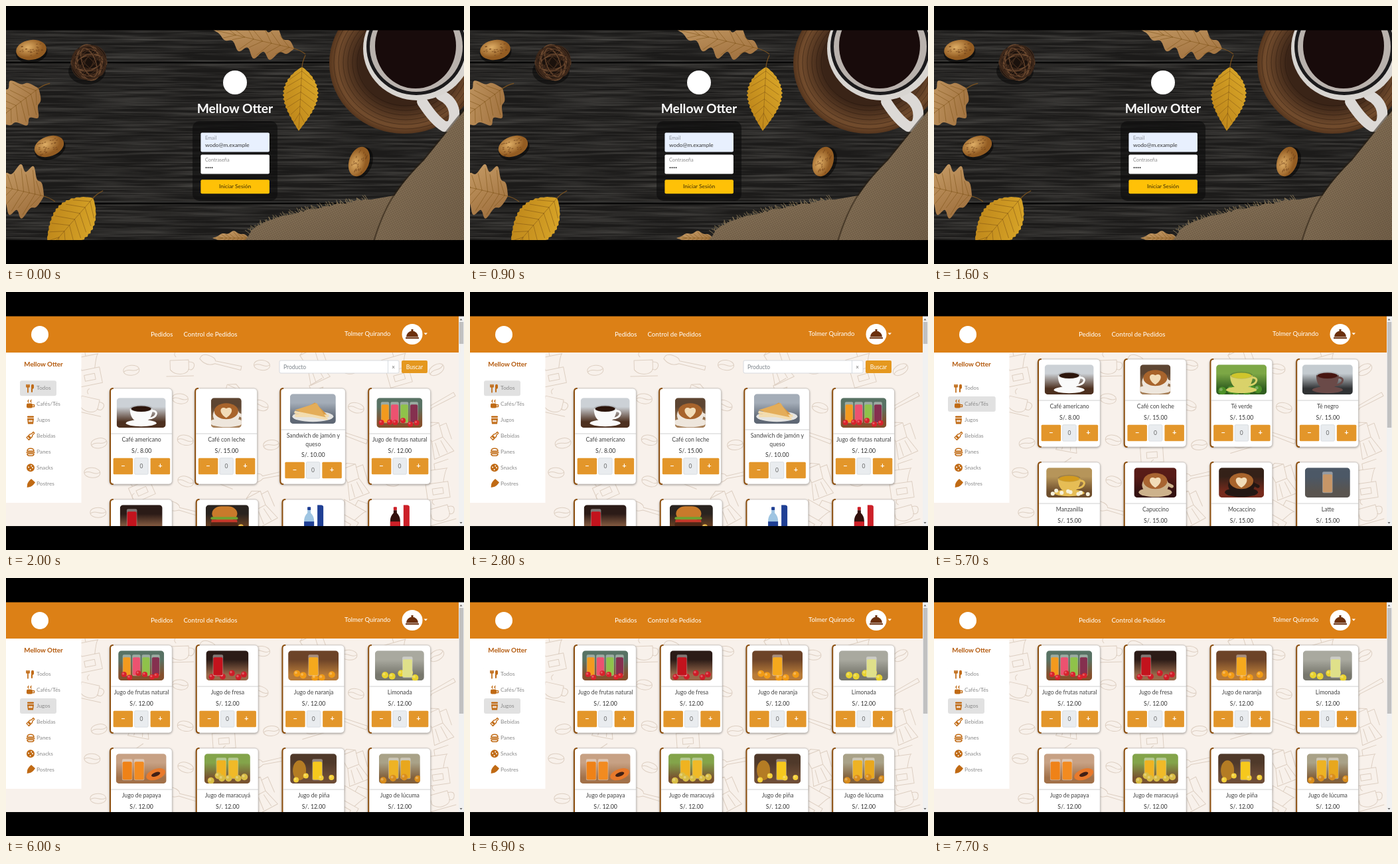
Recreate the animation shown at these times as an HTML page. Size 690 by 388 pixels, loop 8000 ms.

```html
<!DOCTYPE html>
<html lang="es">
<head>
<meta charset="utf-8">
<title>Cafetería</title>
<style>
  html, body { margin: 0; width: 100%; height: 100%; overflow: hidden; background: #000; }
  svg { display: block; width: 100%; height: 100%; font-family: Lato, sans-serif; }
  .scene { visibility: hidden; animation: show 8s step-end infinite; }
  #all { animation-delay: 2s; }
  #coffee { animation-delay: 4s; }
  #juice { animation-delay: 6s; }
  .card { filter: drop-shadow(0 1px 1.5px #0005); }
  .line { fill: none; stroke-linecap: round; stroke-linejoin: round; }
  @keyframes show { 0% { visibility: visible; } 25%, 100% { visibility: hidden; } }
</style>
</head>
<body>
<svg id="stage" viewBox="0 0 690 388">
  <defs>
    <filter id="grain" x="0" y="0" width="1" height="1" color-interpolation-filters="sRGB">
      <feTurbulence type="fractalNoise" baseFrequency=".008 .3" numOctaves="3" seed="4"/>
      <feColorMatrix values="0 0 0 0 .5  0 0 0 0 .49  0 0 0 0 .47  .8 0 0 0 -.29"/>
    </filter>
    <pattern id="weave" width="3" height="3" patternUnits="userSpaceOnUse" patternTransform="rotate(-28)">
      <path d="M0 .5H3M.5 0V3" stroke="#4d3c29" stroke-width=".8" opacity=".4"/>
    </pattern>
    <linearGradient id="cloth" x2="1" y2="1"><stop stop-color="#8f7a5f"/><stop offset="1" stop-color="#75624b"/></linearGradient>
    <radialGradient id="slab"><stop offset=".6" stop-color="#3a2417"/><stop offset=".9" stop-color="#724c2d"/><stop offset="1" stop-color="#55351d"/></radialGradient>
    <radialGradient id="nut" cx=".4" cy=".35"><stop stop-color="#dfae66"/><stop offset="1" stop-color="#935c22"/></radialGradient>
    <linearGradient id="gold" x2="1" y2="1"><stop stop-color="#dcaa2a"/><stop offset="1" stop-color="#b87f17"/></linearGradient>
    <linearGradient id="dry" x2="1" y2="1"><stop stop-color="#9a6a38"/><stop offset="1" stop-color="#cba26c"/></linearGradient>
  </defs>
</svg>
<script>
const TOP = 36, FLOOR = 352, BUTTON = '#e3962a', ICON = '#c06a14';

let seed = 11;
const rand = (a, b) => a + (b - a) * (seed = seed * 16807 % 2147483647) / 2147483647;
const repeat = (n, draw) => Array.from({ length: n }, (_, i) => draw(i)).join('');

const rect = (x, y, w, h, fill, rx = 0, more = '') =>
  `<rect x="${x}" y="${y}" width="${w}" height="${h}" fill="${fill}" rx="${rx}" ${more}/>`;
const oval = (x, y, rx, ry, fill, more = '') =>
  `<ellipse cx="${x}" cy="${y}" rx="${rx}" ry="${ry}" fill="${fill}" ${more}/>`;
const dot = (x, y, r, fill) => oval(x, y, r, r, fill);
const shape = (d, fill) => `<path d="${d}" fill="${fill}"/>`;
const line = (d, color, width = 1) => `<path class="line" d="${d}" stroke="${color}" stroke-width="${width}"/>`;
const at = (x, y, body, turn = 0) => `<g transform="translate(${x} ${y}) rotate(${turn})">${body}</g>`;
const text = (x, y, str, size, fill, anchor = 'start', weight = 400) =>
  `<text x="${x}" y="${y}" font-size="${size}" fill="${fill}" text-anchor="${anchor}" font-weight="${weight}">${str}</text>`;

/* ---- login ---- */

// A leaf grows from its stem (x, y); waves and depth shape its lobes or teeth.
function leaf(x, y, turn, length, half, fill, waves, depth) {
  const steps = 80;
  const edge = t => half * Math.sin(Math.PI * t ** .8) * (1 + depth * Math.sin(t * waves * 2 * Math.PI));
  const side = sign => Array.from({ length: steps + 1 }, (_, i) => [i / steps * length, sign * edge(i / steps)]);
  const veins = repeat(7, i => [-1, 1].map(sign => {
    const t = .06 + i * .11, end = t + .14;
    return `M${t * length} 0L${end * length} ${sign * edge(end) * .85}`;
  }).join(''));
  return at(x, y, line(`M-18 -4Q-8 0 0 0`, '#7a5220', 1.2) +
    shape('M' + [...side(-1), ...side(1).reverse()].join('L') + 'Z', `url(#${fill})`) +
    line(`M0 0H${length * .95}` + veins, '#7a501488', .9), turn);
}

const leaves = () =>
  leaf(49, 124, 143, 85, 32, 'dry', 4, .15) + leaf(57, 286, 193, 80, 36, 'dry', 4, .18) +
  leaf(434, 64, 193, 125, 22, 'dry', 5, .3) + leaf(366, 349, 180, 55, 9, 'dry', 3, .2) +
  leaf(131, 289, 131, 108, 31, 'gold', 16, .03) + leaf(446, 92, 93, 96, 26, 'gold', 16, .04);

const nut = (x, y, turn) => at(x, y, oval(0, 4, 24, 16, '#0008') + oval(0, 0, 23, 15, 'url(#nut)') +
  repeat(28, () => oval(rand(-17, 17), rand(-9, 9), 1.6, .7, '#71431a99')), turn);

const twigBall = () => oval(122, 98, 28, 20, '#0007') + dot(125, 85, 27, '#1a110c') +
  repeat(24, i => at(125, 85, oval(0, 0, rand(18, 28), rand(4, 26), 'none',
    `stroke="${i % 3 ? '#3f291b' : '#6d4a30'}" stroke-width="1.2"`), i * 29));

const mugOnSlab = () => oval(600, 86, 113, 106, 'url(#slab)') +
  repeat(6, i => oval(602, 85, 108 - i * 7, 100 - i * 7, 'none', 'stroke="#1d1009" opacity=".4"')) +
  line('M627 144Q645 172 660 181 678 184 675 158 672 142 655 134', '#dcd9d6', 16) +
  oval(620, 64, 82, 78, '#d8d5d1') + oval(618, 61, 75, 73, '#1b1a1c') +
  oval(618, 61, 70, 68, '#b9b2ad') + oval(617, 60, 61, 64, '#180b0b');

function burlap() {
  const hem = t => [366 + t * 182, 346 - 56 * Math.sqrt(t)];
  const hemPoints = Array.from({ length: 41 }, (_, i) => hem(i / 40).map(v => v + rand(-1.5, 1.5)));
  const threads = repeat(90, i => {
    const [x, y] = hem(i / 90);
    return `M${x} ${y + 3}l${rand(-8, 0)} ${rand(-9, -3)}`;
  });
  const fold = 'M556 352C572 300 590 272 630 232L690 158V352Z';
  const fabric = (d, fill) => shape(d, fill) + shape(d, 'url(#weave)');
  return line(threads, '#97835f', .8) + fabric('M360 352L' + hemPoints.join('L') + 'L585 285V352Z', 'url(#cloth)') +
    line(fold, '#2a1e1288', 5) + fabric(fold, 'url(#cloth)');
}

function login() {
  const wood = rect(0, TOP, 690, 317, '#1c1b1a') + rect(0, TOP, 690, 317, '#000', 0, 'filter="url(#grain)"') +
    [85, 297].map(y => line(`M0 ${y}H690`, '#080808', 2.5) + line(`M0 ${y - 2.5}H690`, '#4a4948', .7)).join('');
  const form = rect(281, 173, 128, 120, '#0d0d0d', 10, 'opacity=".65"') +
    rect(293.4, 190.4, 103.5, 29, '#e8f0fe', 2) + rect(293.4, 223.6, 103.5, 29, '#fff', 2) + rect(293.4, 261.2, 103.5, 21, '#ffc107', 2) +
    text(300, 201, 'Email', 7.3, '#8a8f98') + text(300, 212, 'wodo@m.example', 8.3, '#333') +
    text(300, 234, 'Contraseña', 7.3, '#8a8a8a') + text(300, 245, '••••', 5.2, '#333') +
    text(345, 274, 'Iniciar Sesión', 8.4, '#3b2c06', 'middle');
  return wood + leaves() + nut(38, 66, -8) + nut(65, 211, -20) + nut(532, 234, -70) + twigBall() + mugOnSlab() + burlap() +
    dot(345, 115, 18, '#fff') + text(345, 161, 'Mellow Otter', 19.2, '#fff', 'middle', 700) + form;
}

/* ---- photos: drawn around x = 0, from y = 0 to 45 ---- */

const cup = (body, drink) => oval(0, 38, 23, 5, body) + line('M14 20C27 17 25 31 11 31', body, 3) +
  shape('M-17 16C-17 31-9 37 0 37S17 31 17 16Z', body) + oval(0, 16, 17, 5.5, '#0002') + oval(0, 16.5, 15, 4.2, drink);
const latteCup = (body, drink) => oval(0, 37, 25, 7, body) + line('M13 22L25 28', body, 5) +
  oval(0, 26, 20, 15, body) + oval(0, 20, 18, 12, drink) + shape('M0 30C-13 22-9 11 0 16 9 11 13 22 0 30Z', '#f2dcb8');
const glasses = (...colors) => colors.map((color, i) => {
  const pitch = Math.min(18, 58 / colors.length), x = (i - (colors.length - 1) / 2) * pitch, r = pitch * .43;
  return rect(x - r, 6, r * 2, 32, '#fff6', 2) + rect(x - r + .7, 10, r * 2 - 1.4, 27, color, 2);
}).join('');
const scatter = (color, r, n) => repeat(n, i => {
  const x = -31 + 62 * (i + rand(.2, .8)) / n, y = rand(33, 41);
  return dot(x, y, r, color) + dot(x - r * .3, y - r * .3, r * .4, '#fff4');
});
const bottle = (drink, label) => rect(6, 0, 9, 45, label) + rect(-9, 3, 5, 5, label, 1) +
  shape('M-9 8h5v4q5 5 5 12v21h-15V24q0-7 5-12Z', drink) + rect(-14, 25, 15, 9, label);
const toast = (turn, color) => at(0, 26, shape('M-27 4L3-13 24 8Z', color) + rect(-27, 5, 51, 4, '#f3dcae', 1), turn);
const burger = () => rect(-23, 2, 38, 22, '#c97a2b', 14) + rect(-25, 18, 41, 4, '#6fa232', 2) +
  rect(-24, 22, 39, 5, '#c5382a', 2) + rect(-25, 26, 41, 7, '#4d2716', 3) + rect(-23, 32, 37, 8, '#c98138', 4);

const photos = {
  americano: [74, '#ccd1d6', '#4d301f', () => cup('#fafafa', '#2c150b')],
  conLeche: [46, '#5d4532', '#a67f58', () => latteCup('#eee6dc', '#a8642c')],
  sandwich: [69, '#a4adb8', '#5f6875', () => oval(0, 34, 31, 8, '#e4e4e2') + toast(0, '#d89a45') + toast(12, '#e4ad59')],
  mixed: [69, '#587264', '#84502d', () => glasses('#f39a1e', '#ec5270', '#8fc24a', '#85304f') + scatter('#d8222c', 4, 6)],
  strawberry: [64, '#2b1b17', '#98694a', () => scatter('#ce1c28', 4.5, 6) + at(-14, 0, glasses('#c3131d'))],
  burger: [65, '#29231f', '#754523', () => scatter('#e4b13f', 4, 8) + burger()],
  water: [32, '#fff', '#fff', () => bottle('#9fc5e2', '#1f3f94')],
  soda: [32, '#fff', '#fff', () => bottle('#32110d', '#cc2028')],
  greenTea: [76, '#7ca745', '#315f20', () => scatter('#4c9027', 6, 6) + cup('#d9d26a', '#cfc52c')],
  blackTea: [76, '#c4cbd0', '#303234', () => cup('#6a4a48', '#471611')],
  chamomile: [69, '#b6955a', '#6e4e2c', () => cup('#e6bd55', '#d39b1f') + scatter('#f5f0d8', 3, 8)],
  cappuccino: [64, '#571b17', '#341211', () => latteCup('#cdb28c', '#a86431')],
  mocha: [68, '#342118', '#762a1c', () => latteCup('#241713', '#a8642c')],
  latte: [68, '#4c5866', '#59544f', () => glasses('#c79667')],
  orange: [76, '#6c4328', '#b87b38', () => scatter('#f19b16', 5, 5) + glasses('#f5a91d')],
  lemonade: [74, '#a9a99f', '#77776d', () => scatter('#e8d22d', 5, 5) + at(12, 3, glasses('#dfe08a'))],
  papaya: [76, '#c7a184', '#a27149', () => at(-12, 2, glasses('#ef8217', '#f28b20')) + at(22, 31, oval(0, 0, 15, 8, '#e8792b') + oval(0, 0, 7, 3, '#412016'), -20)],
  passion: [69, '#83a44a', '#785330', () => glasses('#efb321', '#f0ba28') + scatter('#d9bd45', 5, 6)],
  pineapple: [70, '#4f392a', '#6e4d37', () => oval(-21, 25, 10, 15, '#b47c24') + at(6, 2, glasses('#f6c81d')) + scatter('#f4cf38', 4, 4)],
  lucuma: [62, '#a9a288', '#82603b', () => glasses('#eeb324', '#e8a71d') + scatter('#d98d1d', 5, 4)]
};

let clips = 0;
function photo(cx, y, kind) {
  const [w, top, bottom, draw] = photos[kind], id = 'p' + clips++;
  return at(cx, y, `<clipPath id="${id}">${rect(-w / 2, 0, w, 45, '#000', 5)}</clipPath>
    <linearGradient id="${id}g" x2="0" y2="1"><stop offset=".3" stop-color="${top}"/><stop offset=".8" stop-color="${bottom}"/></linearGradient>
    <g clip-path="url(#${id})">${rect(-w / 2, 0, w, 45, `url(#${id}g)`)}${draw()}</g>`);
}

/* ---- shop ---- */

function card(x, y, w, h, pad, kind, titles, price) {
  const cx = x + w / 2, rule = y + pad + 53.5, titleY = rule + 12.5;
  const priceY = titleY + 16.5 + (titles.length - 1) * 12, keyY = priceY + 8;
  const key = (dx, sign) => rect(cx + dx, keyY, 29.5, 24.5, BUTTON, 1.5) +
    text(cx + dx + 14.7, keyY + 15.5, sign, 11, '#fff', 'middle', 700);
  return `<g class="card">${rect(x, y, w, h, '#fff', 5, 'stroke="#c3beb8" stroke-width=".7"')}</g>` +
    line(`M${x + 5} ${y}q-4 0-4 5v${h - 10}q0 5 4 5`, '#8b4d0c', 2) +
    photo(cx + .5, y + pad, kind) + rect(x + 2, rule, w - 2, .7, '#bbb') +
    titles.map((t, i) => text(cx + 1, titleY + i * 12.5, t, 8.7, '#444', 'middle')).join('') +
    text(cx + 1, priceY, 'S/. ' + price, 8.8, '#333', 'middle') + key(-41.5, '−') + key(14.5, '+') +
    rect(cx - 9.5, keyY, 20.5, 24.5, '#e9ecef', 1.5, 'stroke="#ced4da" stroke-width=".7"') +
    text(cx + .7, keyY + 15.3, '0', 8.5, '#666', 'middle');
}

// Cards share one row evenly; a two-line title makes the row taller and its own card wider.
function row(y, items) {
  const lines = items.map(([, title]) => title.split('|')), most = Math.max(...lines.map(l => l.length));
  const widths = lines.map(l => l.length > 1 ? 99 : 94.3);
  const gap = (483.5 - widths.reduce((a, b) => a + b)) / (items.length - 1);
  let x = 156;
  return items.map(([kind, , price = '15.00'], i) => {
    const pad = 8.2 + (most - lines[i].length) * 6;
    const body = card(x, y, widths[i], 120 + most * 12, pad, kind, lines[i], price);
    x += widths[i] + gap;
    return body;
  }).join('');
}

const icons = [
  line('M-4-5V6M-6-5V-2H-2V-5', ICON, 1.7) + rect(1, -6, 4, 7, ICON, 2) + rect(1, 0, 2, 6, ICON),
  rect(-6, -1, 9, 7, ICON, 2) + line('M3 1H5.5V4H3M-3-6Q-5-4-3-3M1-6Q-1-4 1-3', ICON, 1.4),
  rect(-5, -6, 10, 2.5, ICON, 1) + shape('M-5-2.5H5L4 6H-4Z', ICON) + rect(-3, 0, 6, 3, '#fffb'),
  at(0, 0, line('M-1.2-7H1.2V-3L2.5-1V6H-2.5V-1L-1.2-3Z', ICON, 1.4) + rect(-2, 1, 4, 3, ICON), 45),
  line('M-5-1Q-5-5 0-5T5-1ZM-5 3H5Q5 6 2 6H-2Q-5 6-5 3ZM-6 1H6', ICON, 1.5),
  dot(0, 0, 6, ICON) + repeat(4, i => dot(3 * Math.cos(i * 1.7), 3 * Math.sin(i * 1.7), 1, '#fff')),
  at(0, 0, shape('M-4-6H4Q5 0 3 4L0 8-3 4Q-5 0-4-6Z', ICON), 42)
];
const menu = ['Todos', 'Cafés/Tés', 'Jugos', 'Bebidas', 'Panes', 'Snacks', 'Postres'];
const menuY = i => 144.7 + i * 23.9;

const menuItems = () => menu.map((name, i) =>
  at(37, menuY(i), icons[i]) + text(46, menuY(i) + 2.7, name, 8.3, '#898989')).join('');
const highlight = i => rect(21, menuY(i) - 11.5, 34 + menu[i].length * 4.2, 23, '#e1e1e1', 3);

function backdrop() {
  const bean = 'M-12 0C-12-10 12-10 12 0S-12 10-12 0ZM-11 1C-4-5 4 5 11-1';
  const doodles = [
    'M-17 5H17V29H-17ZM-10 5Q-16-14-19-15H19Q16-14 10 5M-8 13H8V22H-8ZM0-15V-24L22-28', bean,
    'M-15-9H13V5Q10 12 0 12T-15 5ZM13-6Q23-6 21 1T12 5M-21 15H20M-6-14Q-10-18-6-22',
    'M-32 0Q-31-9-20-8T-8-2L32-3V3L-8 2Q-20 10-32 0', bean,
    'M-12-22H12L9 0 16 26H-16L-9 0ZM-12-22L0-28 12-22M11-17H22L20 8M-9 0H9M-5 4L-7 24M4 4L6 24', bean
  ];
  const columns = 9;
  return rect(0, TOP, 682, 317, '#f8f1eb') + repeat(columns * 5, i =>
    at(132 + i % columns * 65 + rand(-9, 9), 112 + Math.floor(i / columns) * 55 + rand(-8, 8),
      line(doodles[i % doodles.length], '#ddcfc2'), rand(-30, 30)));
}

const header = () => rect(0, TOP, 682, 55, '#dc8016') + dot(51, 64, 13, '#fff') +
  text(218, 67, 'Pedidos', 9.7, '#fff') + text(267.5, 67, 'Control de Pedidos', 9.7, '#fff') +
  text(510, 66, 'Tolmer Quirando', 9.45, '#fff') + dot(612, 63.5, 15.5, '#fff') +
  shape('M603 67.5a9 9 0 0 1 18 0ZM602 68.3h20v2h-20ZM610.5 59v-3h3v3Z', '#6b2f0d') + shape('M629.5 61.5h5.5l-2.75 3Z', '#fff');

const sidebar = () => rect(0, 92, 113.5, 225, '#fff') + text(56.5, 111.5, 'Mellow Otter', 9.8, '#b3590c', 'middle', 700);

const scrollbar = length => rect(682, TOP, 8, 317, '#f1f1f1') + rect(682.8, 45, 6.4, length, '#c1c1c1') +
  shape('M683.5 42.5h4l-2-2.5ZM683.5 346h4l-2 2.5Z', '#666');

const search = () => rect(412, 103, 180, 19, '#fff', 2, 'stroke="#ced4da" stroke-width=".8"') + rect(575, 103, .8, 19, '#ced4da') +
  text(418, 115.5, 'Producto', 8.5, '#7d848b') + text(583.5, 115.3, 'x', 8.3, '#777', 'middle') +
  rect(596, 103, 39, 19, '#e5981f', 2) + text(615.5, 115.5, 'Buscar', 8.6, '#fff', 'middle');

const juice = (kind, title) => [kind, title, '12.00'];
const americano = ['americano', 'Café americano', '8.00'], conLeche = ['conLeche', 'Café con leche'];
const mixed = juice('mixed', 'Jugo de frutas natural'), strawberry = juice('strawberry', 'Jugo de fresa');

const allCards = () => search() +
  row(145, [americano, conLeche, ['sandwich', 'Sandwich de jamón y|queso', '10.00'], mixed]) +
  row(312, [strawberry, ['burger', ''], ['water', ''], ['soda', '']]);
const coffeeCards = () =>
  row(101, [americano, conLeche, ['greenTea', 'Té verde'], ['blackTea', 'Té negro']]) +
  row(256, [['chamomile', 'Manzanilla'], ['cappuccino', 'Capuccino'], ['mocha', 'Mocaccino'], ['latte', 'Latte']]);
const juiceCards = () =>
  row(101, [mixed, strawberry, juice('orange', 'Jugo de naranja'), juice('lemonade', 'Limonada')]) +
  row(256, [juice('papaya', 'Jugo de papaya'), juice('passion', 'Jugo de maracuyá'),
    juice('pineapple', 'Jugo de piña'), juice('lucuma', 'Jugo de lúcuma')]);

const scene = (id, body) => `<g class="scene" id="${id}">${body}</g>`;

document.getElementById('stage').insertAdjacentHTML('beforeend',
  backdrop() + sidebar() + header() +
  scene('all', highlight(0) + scrollbar(33) + allCards()) +
  scene('coffee', highlight(1) + scrollbar(159) + coffeeCards()) +
  scene('juice', highlight(2) + scrollbar(159) + juiceCards()) +
  menuItems() + scene('login', login()) +
  rect(0, 0, 690, TOP + .5, '#000') + rect(0, FLOOR, 690, 36, '#000'));
</script>
</body>
</html>
```
